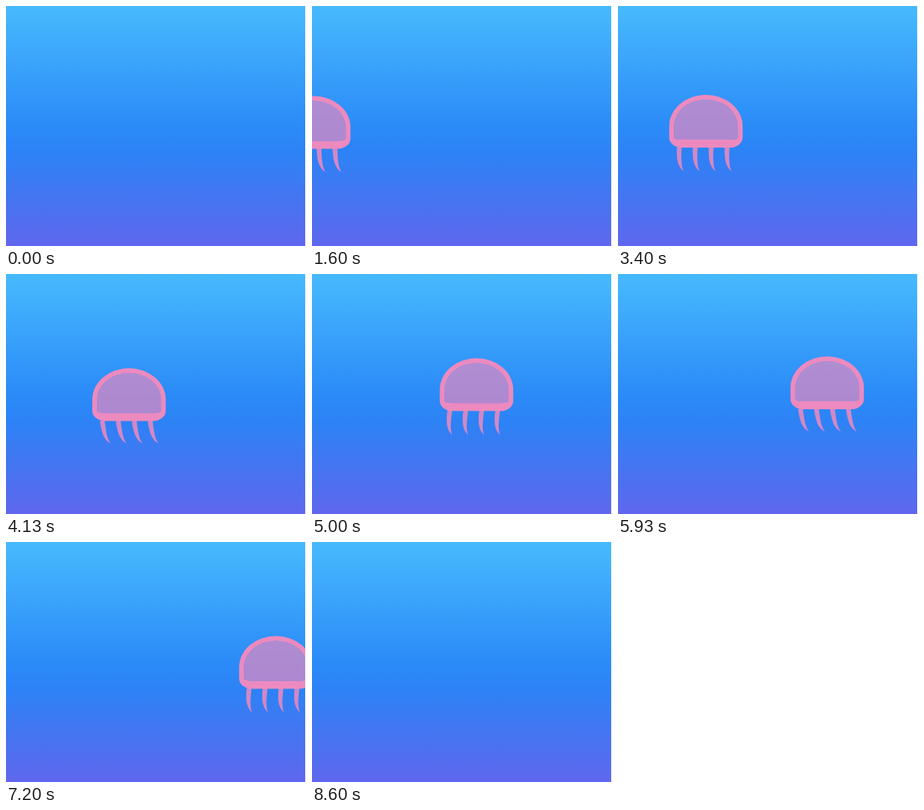
Write an HTML page with a canvas that moves like this. It is 376 px wide and 300 px high and loops after 8.74 s.

```html
<!DOCTYPE html>
<html lang="en">
<head>
<meta charset="utf-8">
<title>Jellyfish</title>
<style>
  html, body { margin: 0; width: 100%; height: 100%; overflow: hidden; background: #fff; }
  canvas { display: block; width: 376px; height: 300px; }
</style>
</head>
<body>
<canvas id="sea"></canvas>
<script>
const W = 376, H = 300, LOOP = 8740, STEP = 1000 / 15;
const PINK = '#ec8abf', TENTACLE = 'rgba(236, 137, 190, .87)', BELL = 'rgba(236, 137, 190, .68)';

const canvas = document.getElementById('sea');
const ctx = canvas.getContext('2d');
const ratio = window.devicePixelRatio || 1;
canvas.width = W * ratio;
canvas.height = H * ratio;
ctx.scale(ratio, ratio);

const water = ctx.createLinearGradient(0, 0, 0, H);
water.addColorStop(0, '#46b9fd');
water.addColorStop(0.04, '#45b6fd');
water.addColorStop(0.5, '#2b8bf8');
water.addColorStop(0.62, '#2d82f5');
water.addColorStop(1, '#5f67ee');

const wave = (t, period, peak) => Math.cos(2 * Math.PI * (t - peak) / period);

// Dome centred on x = 0: elliptical top, small rounded bottom corners.
function dome(half, top, bottom, topR, cornerX, cornerY) {
  const shape = new Path2D();
  shape.ellipse(0, top + topR, half, topR, 0, Math.PI, 2 * Math.PI);
  shape.ellipse(half - cornerX, bottom - cornerY, cornerX, cornerY, 0, 0, Math.PI / 2);
  shape.ellipse(cornerX - half, bottom - cornerY, cornerX, cornerY, 0, Math.PI / 2, Math.PI);
  shape.closePath();
  return shape;
}

const inner = dome(40, 6, 56, 33, 10, 2.5);
const rim = dome(46, 0, 66, 39, 16, 12.5);
rim.addPath(inner);

const tentacle = new Path2D('M-3 0 C-3 14 -1 25 7 29.5 C3 23 3 12 3 0 Z');

function jellyfish(x, y, sway) {
  ctx.save();
  ctx.translate(x, y);
  ctx.fillStyle = TENTACLE;
  for (let i = 0; i < 4; i++) {
    ctx.save();
    ctx.translate(-33.5 + 20 * i, 65.5);
    ctx.rotate(sway);
    ctx.fill(tentacle);
    ctx.restore();
  }
  ctx.fillStyle = BELL;
  ctx.fill(inner);
  ctx.fillStyle = PINK;
  ctx.fill(rim, 'evenodd');
  ctx.restore();
}

function draw(time) {
  const t = Math.floor((time % LOOP + 5) / STEP) * STEP;
  ctx.fillStyle = water;
  ctx.fillRect(0, 0, W, H);
  const x = -93.8 + 0.06 * t;
  const y = 109.1 + 8.8 * wave(t, 3000, 1040);
  jellyfish(x, y, -0.13 * wave(t, 2000, 0));
  // white edge on the right
  ctx.fillStyle = '#fff';
  ctx.fillRect(W - 1, 0, 1, H);
}

let start;
function tick(now) {
  if (start === undefined) start = now;
  draw(now - start);
  requestAnimationFrame(tick);
}
draw(0);
requestAnimationFrame(tick);
</script>
</body>
</html>
```
